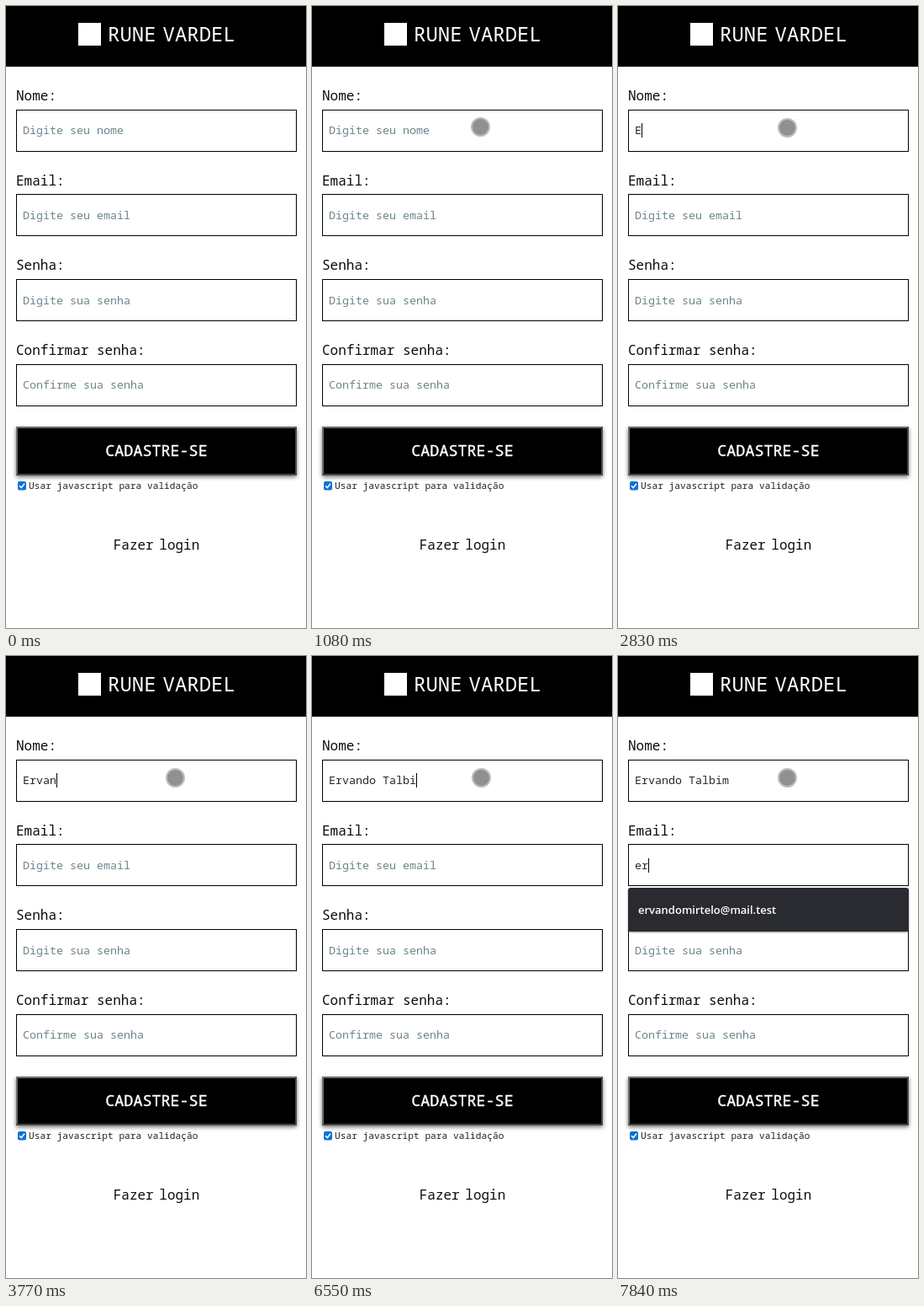
These frames come from a looping animation (357x738 px, 8 s). An HTML page:

```html
<!DOCTYPE html>
<html lang="pt-BR">
<head>
<meta charset="utf-8">
<title>Cadastro</title>
<style>
  html, body { margin: 0; width: 100%; height: 100%; overflow: hidden; background: #fff; }
  svg { display: block; }
  text { font-family: "Noto Sans Mono", "Liberation Mono", monospace; white-space: pre; }
  .label { font-size: 16px; fill: #0c0c0c; }
  .value { font-size: 13.333px; fill: #20292f; }
  .value.empty { fill: #6c848b; }
  .field { fill: #fff; stroke: #000; }
  .brand { font-size: 24px; fill: #fff; word-spacing: -6.5px; }
  .button { filter: drop-shadow(0 2px 2.5px rgba(0, 0, 0, .55)); }
  .submit { font-size: 18.4px; fill: #fff; stroke: #fff; stroke-width: .4px; text-anchor: middle; }
  .note { font-size: 11.2px; fill: #222; }
  .login { font-size: 16px; fill: #0c0c0c; word-spacing: -3px; text-anchor: middle; }
  .hint rect { fill: #2a2b30; filter: drop-shadow(0 1px 1px rgba(0, 0, 0, .4)); }
  .hint text { font: 600 13px "Open Sans", "Noto Sans", sans-serif; fill: #fff; }
</style>
</head>
<body>
<svg width="357" height="738" viewBox="0 0 357 738">
  <rect width="357" height="72"/>
  <rect x="86" y="20" width="27" height="27" fill="#fff"/>
  <text class="brand" x="121" y="41.5">RUNE VARDEL</text>

  <g id="form"></g>

  <g class="button">
    <rect x="12" y="499" width="334" height="58"/>
    <path d="M12 557V499H346L344 501H14V555Z" fill="#6c6c6c"/>
    <path d="M346 499V557H12L14 555H344V501Z" fill="#464646"/>
  </g>
  <text class="submit" x="179" y="534">CADASTRE-SE</text>

  <rect x="14" y="564" width="10" height="10.5" rx="2" fill="#0b74d6"/>
  <path d="M16 569.3L18.2 571.5L22 566.7" fill="none" stroke="#fff" stroke-width="1.5"/>
  <text class="note" x="27" y="573">Usar javascript para validação</text>
  <text class="login" x="179" y="645">Fazer login</text>

  <g class="hint" id="hint">
    <rect x="12" y="275" width="334" height="52" rx="3"/>
    <text x="24" y="306">ervandomirtelo@mail.test</text>
  </g>
  <rect id="caret" width="1" height="17"/>
  <g id="pointer">
    <circle id="touch" r="10.5" fill="#909090" stroke="#bdbdbd" stroke-width="2"/>
    <polygon id="move" stroke="#fff" stroke-width="1.6" paint-order="stroke" transform="translate(-.5 -.5)"/>
  </g>
</svg>
<script>
const LOOP = 8000, ROW = 100.67, CHAR = 8, BLINK = 530, PACE = 244, STEP = 67;
const $ = id => document.getElementById(id);
const show = (el, on) => el.setAttribute("visibility", on ? "visible" : "hidden");
const clamp = (v, lo, hi) => Math.min(hi, Math.max(lo, v));

const rows = [
  ["Nome:", "Digite seu nome"],
  ["Email:", "Digite seu email"],
  ["Senha:", "Digite sua senha"],
  ["Confirmar senha:", "Confirme sua senha"],
];

function add(tag, attrs, content = "") {
  const el = document.createElementNS("http://www.w3.org/2000/svg", tag);
  for (const key in attrs) el.setAttribute(key, attrs[key]);
  el.textContent = content;
  return $("form").appendChild(el);
}

const values = rows.map(([label, placeholder], i) => {
  const y = i * ROW;
  add("text", { class: "label", x: 12, y: Math.round(112 + y) }, label);
  add("rect", { class: "field", x: 12.5, y: Math.floor(123 + y) + .5, width: 333, height: 49 });
  return add("text", { class: "value empty", x: 20, y: Math.round(152.3 + y) }, placeholder);
});

// One arrow, turned to the four sides.
let arm = [[-1, -1], [-1, -4], [-3.5, -4], [0, -7.5], [3.5, -4], [1, -4]];
const cross = [];
for (let i = 0; i < 4; i++) {
  cross.push(...arm);
  arm = arm.map(([x, y]) => [-y, x]);
}
$("move").setAttribute("points", cross.join(" "));

// Each word starts at a given time and is typed at an even pace.
const typing = [
  { focus: 1630, words: [["Ervando", 2630], [" Talbim", 5160]] },
  { focus: 6890, words: [["er", 7570]] },
];
const moveIcon = [[1540, 1630], [2290, 2560], [5230, 5620]];

function typed({ focus, words }, t) {
  let text = "", since = focus;
  for (const [word, start] of words) {
    const n = clamp(Math.floor((t - start) / PACE) + 1, 0, word.length);
    if (n) since = start + (n - 1) * PACE;
    text += word.slice(0, n);
  }
  return { text, since };
}

// Swipe along a curve in even steps, then a small nudge.
function pointerAt(t) {
  const steps = Math.floor((t - 70) / STEP);
  const u = clamp(steps / 11, 0, 1), v = 1 - u;
  const bend = (a, b, c) => v * v * a + 2 * u * v * b + u * u * c;
  const nudge = clamp(Math.floor((t - 1010) / 70) + 1, 0, 3);
  return [bend(346, 226, 198.5) + nudge, bend(728, 432, 141.5) + nudge];
}

function draw(t) {
  let caretOn = false;
  typing.forEach((entry, i) => {
    const { text, since } = typed(entry, t);
    values[i].textContent = text || rows[i][1];
    values[i].classList.toggle("empty", !text);
    if (t < entry.focus) return;
    caretOn = Math.floor((t - since) / BLINK) % 2 === 0;
    $("caret").setAttribute("x", 20 + text.length * CHAR);
    $("caret").setAttribute("y", Math.round(139 + i * ROW));
  });
  show($("caret"), caretOn);

  const moving = moveIcon.some(([from, to]) => t >= from && t < to);
  show($("touch"), t >= 70 && !moving);
  show($("move"), moving);
  $("pointer").setAttribute("transform", `translate(${pointerAt(t)})`);

  show($("hint"), t >= 7640);
}

function tick() {
  draw(performance.now() % LOOP);
  requestAnimationFrame(tick);
}
tick();
</script>
</body>
</html>
```
